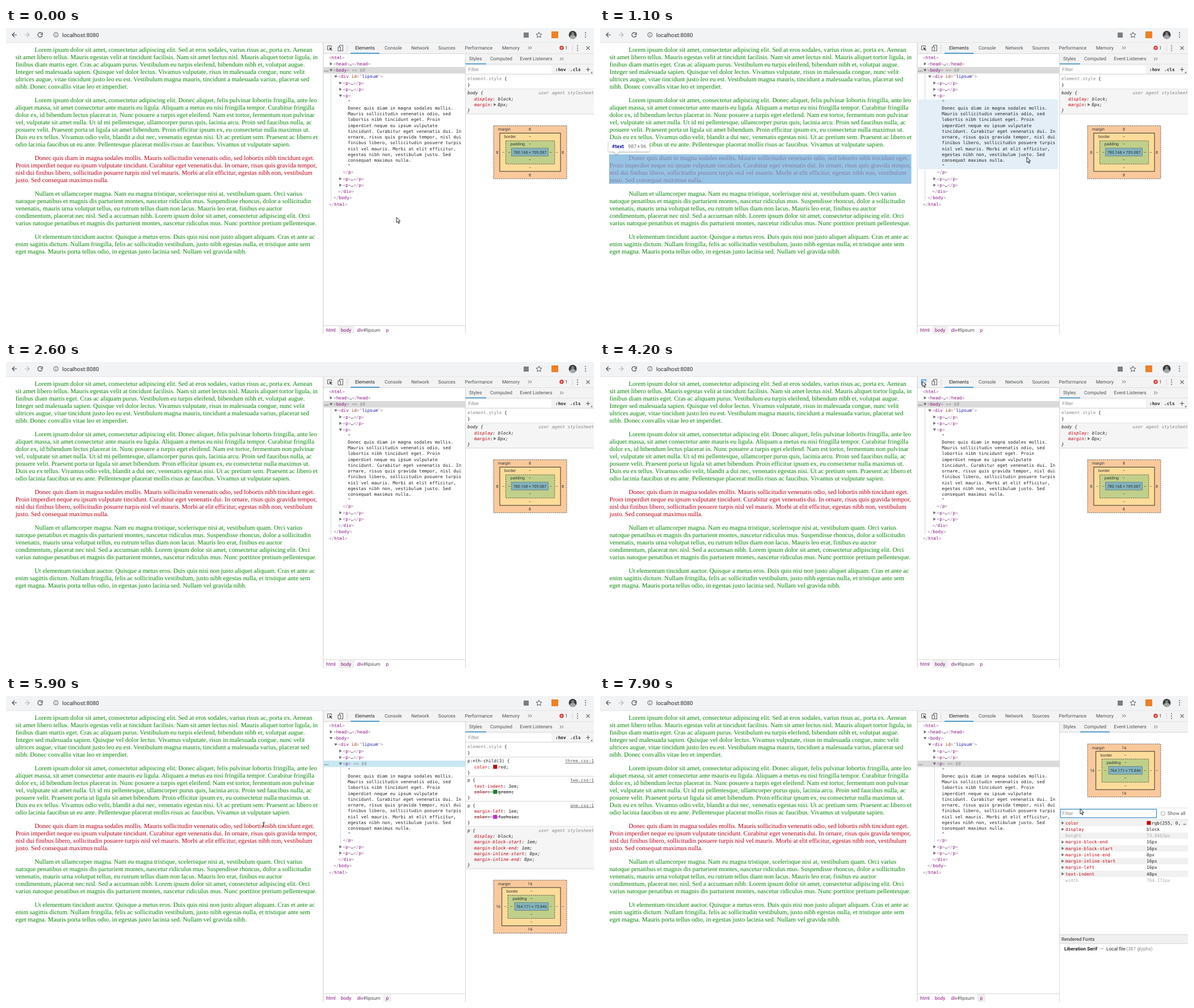
Recreate the animation shown at these times as an HTML page. Size 1036x540 px, loop 8 s.

```html
<!DOCTYPE html>
<html lang="en">
<head>
<meta charset="utf-8">
<title>Inspecting a paragraph</title>
<style>
html, body { margin: 0; width: 100%; height: 100%; overflow: hidden; background: #fff; }
svg { display: block; text-rendering: geometricPrecision; }
text { white-space: pre; cursor: default; }
.page { font: 11.23px "Liberation Serif", serif; fill: #0a860a; }
.red { fill: #bb0018; }
.ui { font: 8.42px Roboto, sans-serif; fill: #4c5054; }
.small { font: 7.02px Roboto, sans-serif; fill: #333; }
.mono { font: 7.72px "DejaVu Sans Mono", monospace; fill: #222; }
.url { font-size: 9.85px; fill: #2b2e31; }
.tip { font: 9.1px Roboto, sans-serif; fill: #707070; }
.dark { fill: #222; }
.gray { fill: #888; }
.dim { fill: #aaa; }
.tag { fill: #881280; }
.br { fill: #a080a0; }
.attr { fill: #994500; }
.val { fill: #1a1aa6; }
.prop { fill: #c00010; }
.it { font-style: italic; }
.b { font-weight: bold; }
.mid { text-anchor: middle; }
.end { text-anchor: end; }
.link { fill: #555; text-decoration: underline; }
.off { display: none; }
#tip { filter: drop-shadow(0 1px 1.5px rgba(0, 0, 0, .35)); }
</style>
</head>
<body>
<svg id="stage" width="1036" height="540" viewBox="0 0 1036 540"></svg>
<script>
const EM = 11.25, LINE = 12.985, TOP = 31.6, LEFT = 5.6;
const CODE = 10.25;
const LOOP = 8000, STEP = 100;
const $ = id => document.getElementById(id);

// ---- drawing helpers (y is the middle of the text line) ----
const esc = s => s.replace(/</g, '&lt;').replace(/>/g, '&gt;');
const span = (cls, s) => `<tspan class="${cls}">${esc(s)}</tspan>`;
const text = (x, y, s, cls, drop) => `<text x="${x}" y="${y + drop}" class="${cls}">${s}</text>`;
const ui = (x, y, s, cls = '') => text(x, y, s, 'ui ' + cls, 2.9);
const mono = (x, y, s, cls = '') => text(x, y, s, 'mono ' + cls, 2.7);
const small = (x, y, s, cls = 'mid') => text(x, y, s, 'small ' + cls, 2.5);
const rect = (x, y, x2, y2, fill, more = '') =>
  `<rect x="${x}" y="${y}" width="${x2 - x}" height="${y2 - y}" fill="${fill}" ${more}/>`;
const path = (d, stroke, w = 1, fill = 'none') =>
  `<path d="${d}" stroke="${stroke}" stroke-width="${w}" fill="${fill}"/>`;
const hline = (x, x2, y, c = '#ccc') => path(`M${x} ${y}H${x2}`, c, .8);
const vline = (x, y, y2, c = '#ccc') => path(`M${x} ${y}V${y2}`, c, .8);
const dot = (x, y, r, fill) => `<circle cx="${x}" cy="${y}" r="${r}" fill="${fill}"/>`;
const dots = x => [-4, 0, 4].map(d => dot(x, d, 1, '#5a5e62')).join('');
const group = (id, s) => `<g id="${id}">${s}</g>`;
const tri = (x, y, open, c = '#6e6e6e') =>
  path(open ? `M${x - 2.8} ${y - 2}h5.6l-2.8 4.4z` : `M${x - 2} ${y - 2.8}v5.6l4.4-2.8z`, 'none', 0, c);
const tag = s => s.replace(/<\/?|>|\w+|…/g, m =>
  m === '…' ? m : span(/\w/.test(m) ? 'tag' : 'br', m));

// ---- the web page ----
const paras = [
  ['Lorem ipsum dolor sit amet, consectetur adipiscing elit. Sed at eros sodales, varius risus ac, porta ex. Aenean',
   'sit amet libero tellus. Mauris egestas velit at tincidunt facilisis. Nam sit amet lectus nisl. Mauris aliquet tortor ligula, in',
   'finibus diam mattis eget. Cras ac aliquam purus. Vestibulum eu turpis eleifend, bibendum nibh et, volutpat augue.',
   'Integer sed malesuada sapien. Quisque vel dolor lectus. Vivamus vulputate, risus in malesuada congue, nunc velit',
   'ultrices augue, vitae tincidunt justo leo eu est. Vestibulum magna mauris, tincidunt a malesuada varius, placerat sed',
   'nibh. Donec convallis vitae leo et imperdiet.'],
  ['Lorem ipsum dolor sit amet, consectetur adipiscing elit. Donec aliquet, felis pulvinar lobortis fringilla, ante leo',
   'aliquet massa, sit amet consectetur ante mauris eu ligula. Aliquam a metus eu nisi fringilla tempor. Curabitur fringilla',
   'dolor ex, id bibendum lectus placerat in. Nunc posuere a turpis eget eleifend. Nam est tortor, fermentum non pulvinar',
   'vel, vulputate sit amet nulla. Ut id mi pellentesque, ullamcorper purus quis, lacinia arcu. Proin sed faucibus nulla, ac',
   'posuere velit. Praesent porta ut ligula sit amet bibendum. Proin efficitur ipsum ex, eu consectetur nulla maximus ut.',
   'Duis eu ex tellus. Vivamus odio velit, blandit a dui nec, venenatis egestas nisi. Ut ac pretium sem. Praesent ac libero et',
   'odio lacinia faucibus ut eu ante. Pellentesque placerat mollis risus ac faucibus. Vivamus ut vulputate sapien.'],
  ['Donec quis diam in magna sodales mollis. Mauris sollicitudin venenatis odio, sed lobortis nibh tincidunt eget.',
   'Proin imperdiet neque eu ipsum vulputate tincidunt. Curabitur eget venenatis dui. In ornare, risus quis gravida tempor,',
   'nisl dui finibus libero, sollicitudin posuere turpis nisl vel mauris. Morbi at elit efficitur, egestas nibh non, vestibulum',
   'justo. Sed consequat maximus nulla.'],
  ['Nullam et ullamcorper magna. Nam eu magna tristique, scelerisque nisi at, vestibulum quam. Orci varius',
   'natoque penatibus et magnis dis parturient montes, nascetur ridiculus mus. Suspendisse rhoncus, dolor a sollicitudin',
   'venenatis, mauris urna volutpat tellus, eu rutrum tellus diam non lacus. Mauris leo erat, finibus eu auctor',
   'condimentum, placerat nec nisl. Sed a accumsan nibh. Lorem ipsum dolor sit amet, consectetur adipiscing elit. Orci',
   'varius natoque penatibus et magnis dis parturient montes, nascetur ridiculus mus. Nunc porttitor pretium pellentesque.'],
  ['Ut elementum tincidunt auctor. Quisque a metus eros. Duis quis nisi non justo aliquet aliquam. Cras et ante ac',
   'enim sagittis dictum. Nullam fringilla, felis ac sollicitudin vestibulum, justo nibh egestas nulla, et tristique ante sem',
   'eget magna. Mauris porta tellus odio, in egestas justo lacinia sed. Nullam vel gravida nibh.']
];

// Boxes that can be highlighted; m holds margins: top, right, bottom, left.
const boxes = {
  html: { x: 0, y: 26, w: 558.6, h: 508.7, name: span('tag', 'html'), size: '796.17×725.09' },
  body: { x: LEFT, y: TOP, w: 547.4, h: 497.5, m: [5.6, 5.6, 5.6, 5.6], name: span('tag', 'body'), size: '780.17×709.09' },
  div: { x: LEFT, y: TOP, w: 547.4, h: 370, name: span('tag', 'div') + span('val', '#lipsum'), size: '780.17×525.53' }
};
let pageText = '', y = TOP;
paras.forEach((lines, i) => {
  const h = lines.length * LINE;
  boxes['p' + (i + 1)] = {
    x: 16.8, y, w: 536.1, h, m: [EM, 0, EM, EM],
    name: span('tag', 'p'), size: '764.17×' + (lines.length * 24 / 1.3).toFixed(2)
  };
  lines.forEach((s, n) => {
    pageText += text(n ? 16.7 : 50.4, y + 6.5 + n * LINE, s, i === 2 ? 'page red' : 'page', 3.5);
  });
  y += h + EM;
});
boxes.text = { x: 16, y: boxes.p3.y, w: 532.6, h: 52, name: span('val', '#text'), size: '987×96' };

// ---- browser bar ----
const bar = rect(0, 0, 1036, 26, '#f2f3f4') + hline(0, 1036, 25.8, '#dcdddf') +
  path('M19 12H11M15 8l-4 4l4 4', '#4a4d51', 1.2) +
  path('M33 12h8M37 8l4 4l-4 4', '#b4b6b9', 1.2) +
  path('M63 9.3A4 4 0 1 0 64 13M64.3 8v3.3h-3.3', '#4a4d51', 1.2) +
  `<circle cx="88" cy="12" r="4" fill="none" stroke="#5f6368"/>` +
  path('M88 11.5v2.7M88 9.6v1', '#5f6368') +
  text(99, 12, 'localhost:8080', 'ui url', 3.5) +
  rect(912, 8, 921, 17, '#7b7f84') +
  path('M939 7.3l1.5 3.2l3.5.4l-2.6 2.4l.7 3.5l-3.1-1.8l-3.1 1.8l.7-3.5l-2.6-2.4l3.5-.4z', '#55595d') +
  rect(961, 6, 973, 18, '#ee8126') +
  dot(998.5, 12, 7, '#3c3d3e') + path('M993 17a5.5 5 0 0 1 11 0a7 7 0 0 1-11 0z', 'none', 0, '#a5a6a4') +
  dot(998.5, 10, 2.4, '#85837f') +
  `<g transform="translate(0 12)">${dots(1021)}</g>`;

// ---- developer tools: top bar ----
const tabs = [['Elements', 615], ['Console', 667], ['Network', 714], ['Sources', 761.5],
  ['Performance', 808.5], ['Memory', 874]];
const more = (x, y) => path(`M${x} ${y - 2.5}l2.5 2.5l-2.5 2.5m3.5-5l2.5 2.5l-2.5 2.5`, '#5a5e62', 1);
const tools = rect(559, 26, 1036, 540, '#fff') + rect(559, 26, 1036, 45, '#f3f3f3') +
  hline(559, 1036, 45.3) + vline(559, 26, 540, '#bbb') +
  tabs.map(([s, x], i) => ui(x, 35, s, i ? '' : 'dark')).join('') +
  rect(607, 43.8, 658, 45.4, '#2a8bc4') +
  path('M573.5 34V31.5h-7v7h3', '#5a5e62') + path('M569.5 34l5.5 2l-2.2 1l2 2.2l-1 1l-2-2.2l-1 2z', 'none', 0, '#4a4e52') +
  group('picking', path('M574 34V31.5h-7.5v8h3', '#2d86d9', 1.4) +
    rect(567, 32, 573.5, 39, '#cfe4f8')) +
  path('M587.5 33v-2.5h6v10h-3M585 33.5h4.5v7h-4.5z', '#5a5e62') + vline(601, 30, 41) +
  more(920, 35) + dot(979, 35, 3.8, '#d93a3a') + path('M977.6 33.6l2.8 2.8m0-2.8l-2.8 2.8', '#fff', .9) +
  ui(985, 35, '1') + vline(998, 30, 41) +
  `<g transform="translate(0 35.5)">${dots(1007)}</g>` +
  path('M1022.5 32.3l6 6m0-6l-6 6', '#5a5e62', 1.2);

// ---- element tree ----
const closed = tag('<p>…</p>');
const rows = [
  [52, 569, tag('<html>')], [63.3, 577, tag('<head>…</head>'), 0], [74.5, 577, tag('<body>'), 1],
  [85.7, 585.3, tag('<div') + ' ' + span('attr', 'id') + span('br', '="') + span('val', 'lipsum') + span('br', '">'), 1],
  [97, 593.6, closed, 0], [108.3, 593.6, closed, 0], [119.6, 593.6, tag('<p>'), 1], [130.7, 602.3, '"'],
  [243.7, 602.3, '"'], [254.7, 593.6, tag('</p>')], [266, 593.6, closed, 0], [277.2, 593.6, closed, 0],
  [288.4, 585.3, tag('</div>')], [299.6, 577, tag('</body>')], [310.8, 569, tag('</html>')]
];
const nodeText = ['Donec quis diam in magna sodales mollis.', 'Mauris sollicitudin venenatis odio, sed',
  'lobortis nibh tincidunt eget. Proin', 'imperdiet neque eu ipsum vulputate',
  'tincidunt. Curabitur eget venenatis dui. In', 'ornare, risus quis gravida tempor, nisl dui',
  'finibus libero, sollicitudin posuere turpis', 'nisl vel mauris. Morbi at elit efficitur,',
  'egestas nibh non, vestibulum justo. Sed', 'consequat maximus nulla.'];
const selected = (y, x, guide, end) => mono(x, y, '== $0', 'it gray') +
  [561.5, 564.3, 567.1].map(d => dot(d, y + 1.6, .8, '#555')).join('') + vline(guide, y + 6, end, '#b9cfd8');
const tree = rows.map(([y, x, s, open]) =>
  mono(x, y, s) + (open === undefined ? '' : tri(x - 4.3, y, open))).join('') +
  nodeText.map((s, i) => mono(602.3, 141 + i * 10.28, s)).join('');

const crumbs = hline(559, 809, 525.3) + ui(564, 533, 'html', 'tag') + ui(590, 533, 'body', 'tag') +
  ui(618.5, 533, span('tag', 'div') + span('', '#lipsum')) + ui(669.5, 533, 'p', 'tag');

// ---- sidebar ----
const sideTabs = rect(810, 45.6, 1036, 64, '#f3f3f3') + hline(810, 1036, 64) +
  group('tabHover', rect(846, 46, 898, 63.6, '#eaeaea')) + ui(816, 54, 'Styles') + ui(853, 54, 'Computed') +
  ui(905.5, 54, 'Event Listeners') + more(976, 54.5) +
  `<rect id="underline" y="62.6" height="1.5" fill="#2a8bc4"/>`;

function rule(y, selector, props, link, ua) {
  const it = ua ? 'it' : '', close = y + CODE * (props.length + 1);
  let s = ua ? rect(810, y - 6.6, 1036, close + 6.3, '#f5f5f5') : '';
  s += mono(813, y, selector + ' {', it);
  if (link) s += mono(1036, y, link, 'end ' + (ua ? 'it gray' : 'link'));
  props.forEach(([name, value, swatch, struck], i) => {
    const py = y + CODE * (i + 1), vx = 825 + (name.length + 2) * 4.648;
    s += mono(825, py, span('prop', name) + ':', it);
    if (swatch === 'arrow') s += tri(vx - .8, py, 0);
    s += mono(vx + (swatch ? swatch === 'arrow' ? 4 : 9.4 : 0), py, value + ';', it);
    if (struck) s += hline(825, vx + 14 + value.length * 4.648, py + .2, '#555');
    if (swatch && swatch !== 'arrow') s += rect(vx + .8, py - 3.4, vx + 7.8, py + 3.4, swatch, 'stroke="#888" stroke-width=".4"');
  });
  return s + mono(813, close, '}', it) + hline(810, 1036, close + 6.4);
}

// Stacks rules below one another, each given as the arguments after y.
function rules(y, list) {
  return list.map(args => {
    const s = rule(y, ...args);
    y += CODE * (args[1].length + 2) + 3.2;
    return s;
  }).join('');
}

function boxModel(y, inset, m, right, size) {
  const b = 870 + inset, p = 880.5 + inset, c = 890.5 + inset * 1.5, cx = (c + 955.5) / 2;
  const dash = 'stroke="#333" stroke-width=".8" stroke-dasharray="2 1.4"';
  const solid = 'stroke="#222" stroke-width=".9"', mx = inset ? 923.5 : 923;
  return rect(859, y, 988, y + 93.5, '#f9c99c', dash) +
    rect(b, y + 13, 977, y + 80.5, '#fddc9a', solid) +
    rect(p, y + 26.5, 966.7, y + 67.5, '#c0d08a', dash) +
    rect(c, y + 39.5, 955.5, y + 53.5, '#82b4bd', 'stroke="#777" stroke-width=".8"') +
    small(867, y + 6.3, 'margin', '') + small(b + 8, y + 19.3, 'border', '') + small(p + 8.3, y + 32.3, 'padding', '') +
    [6.3, 86.7].map(d => small(mx, y + d, m)).join('') +
    [19.3, 32.3, 60.2, 73.7].map(d => small(cx, y + d, '–')).join('') +
    small(cx, y + 46.5, size) + small(inset ? 867.3 : 865.5, y + 46.5, m) + small(981, y + 46.5, right) +
    [b + 6.2, p + 6.2, 960, 970.5].map(x => small(x, y + 46.5, '–')).join('');
}

const styleTop = rect(810, 64.5, 1036, 81.4, '#f3f3f3') + rect(810, 66, 961, 80.5, '#fff') + hline(810, 1036, 81.6) +
  ui(814.5, 73, 'Filter', 'gray') + mono(968, 73, ':hov', 'b') + mono(994, 73, '.cls', 'b') +
  path('M1022 73.3h7m-3.5-3.5v7', '#555', 1.1) + path('M1033 79.5v-3l-3 3z', 'none', 0, '#666') +
  mono(813, 89.7, span('gray', 'element.style') + ' {') + mono(813, 100, '}') + hline(810, 1036, 107.8);
const bodyStyles = rules(114.7, [
  ['body', [['display', 'block'], ['margin', '8px', 'arrow']], 'user agent stylesheet', true]
]) + boxModel(172.5, 0, '8', '8', '780.168 × 709.087');
const pBox = y => boxModel(y, 3.7, '16', '–', '764.171 × 73.846');
const pStyles = rules(114.7, [
  ['p:nth-child(3)', [['color', 'red', '#c4000c']], 'three.css:1'],
  ['p', [['text-indent', '3em'], ['color', 'green', '#12821a', true]], 'two.css:1'],
  ['p', [['margin-left', '1em'], ['color', 'fuchsia', '#d420d4', true]], 'one.css:1'],
  ['p', [['display', 'block'], ['margin-block-start', '1em'], ['margin-block-end', '1em'],
    ['margin-inline-start', '0px'], ['margin-inline-end', '0px']], 'user agent stylesheet', true]
]) + pBox(325);

const values = [['color', 'rgb(255, 0, …'], ['display', 'block'], ['height', '73.8462px'], ['margin-block-end', '16px'],
  ['margin-block-start', '16px'], ['margin-inline-end', '0px'], ['margin-inline-start', '16px'],
  ['margin-left', '16px'], ['text-indent', '48px'], ['width', '764.171px']];
const computed = pBox(84.7) + hline(810, 1036, 197.5, '#ddd') +
  rect(811.5, 199.8, 980.5, 214.8, '#fff', 'stroke="#4f97c9" stroke-width="1.4"') +
  ui(814.5, 207.5, 'Filter', 'gray') +
  rect(988.5, 204, 995, 210.5, '#fff', 'stroke="#999" stroke-width=".8" rx="1"') + ui(1000, 207.5, 'Show all') +
  hline(810, 1036, 218) +
  values.map(([name, value], i) => {
    const y = 224 + i * 11.23, dim = /height|width/.test(name) ? 'dim' : '';
    return (i % 2 ? '' : rect(810, y - 5.6, 1036, y + 5.6, '#f1f1f1')) + (dim ? '' : tri(815.3, y, 0)) +
      mono(820, y, name, dim || 'prop') + (i ? '' : rect(963.5, y - 3.4, 970.5, y + 3.4, '#c4000c')) +
      mono(i ? 963 : 972, y, value, dim);
  }).join('') +
  rect(810, 421, 1036, 437, '#f0f0f0') + hline(810, 1036, 421) + hline(810, 1036, 437) +
  ui(813, 429, 'Rendered Fonts', 'dark') + ui(818, 446, 'Liberation Serif', 'b dark') +
  ui(881, 446, '—') + ui(892, 446, 'Local file', 'dark') + ui(927, 446, '(387 glyphs)', 'gray');

// ---- stage ----
$('stage').innerHTML = rect(0, 0, 1036, 540, '#fff') + pageText +
  group('mark', '') + group('tip', '') + bar + tools +
  group('onBody', rect(559.5, 69, 809, 80.4, '#dadada') + selected(74.5, 609.6, 572.6, 305) + rect(586, 526, 613.5, 540, '#f0f0f0')) +
  group('onP', '<rect id="row" x="559.5" y="114" width="249.5" height="11.4"/>' +
    selected(119.6, 612.3, 589.6, 260) + rect(665, 526, 679, 540, '#f0f0f0')) +
  `<rect id="hover" x="561" width="246" rx="3" fill="#e3eef6"/>` + tree + crumbs +
  vline(809.5, 45, 540) + sideTabs +
  group('styleTop', styleTop) + group('bodyStyles', bodyStyles) + group('pStyles', pStyles) + group('computed', computed) +
  group('arrow', path('M0 0v9.3l2.2-2l1.5 3.6l1.5-.7l-1.5-3.4h2.9z', '#111', .9, '#fff')) +
  group('beam', path('M-2 -4.2q2 0 2 1v6.4q0 1-2 1M2 -4.2q-2 0-2 1v6.4q0 1 2 1', '#222', .9));

// ---- motion: time, x, y ----
const moves = [
  [0, 688, 334], [100, 687, 333], [200, 687, 333], [400, 697, 322], [700, 745, 279], [900, 757, 246],
  [1100, 752, 228], [1400, 700, 190], [1800, 612, 146], [2000, 612, 146], [2300, 594, 137], [2400, 594, 112],
  [2500, 596, 80], [2600, 600, -20], [3100, 628, -20], [3200, 625, 3], [3600, 590, 22], [4000, 568, 34],
  [4500, 568, 34], [4700, 545, 52], [5000, 485, 150], [5300, 454, 227], [5900, 454, 227], [6100, 478, 218],
  [6300, 640, 155], [6500, 815, 82], [6700, 867, 62], [6900, 871, 58], [7400, 871, 58], [7900, 846, 199]
];
// Highlighted box and its tree row; no row means it comes from the box model.
const hovers = [
  [0], [500, 'html', 310.8], [600, 'body', 299.6], [700, 'div', 288.4], [800, 'p5', 277.2], [900, 'p4', 266],
  [1000, 'p3', 254.7], [1100, 'text', 187.5], [2500, 'p2', 108.3], [2600], [4700, 'p1', 97], [4900, 'p2', 108.3],
  [5100, 'p3', 119.6], [5900], [6300, 'text', 187.5], [6400, 'p2', 108.3], [6500, 'p1', 97], [6600], [7600, 'p3'], [7800]
];

const show = (id, on) => $(id).classList.toggle('off', !on);
const move = (id, x, y) => $(id).setAttribute('transform', `translate(${x} ${y})`);

function pointer(t) {
  const i = moves.findIndex(m => m[0] > t);
  if (i < 0) return moves[moves.length - 1].slice(1);
  const [t0, x0, y0] = moves[i - 1], [t1, x1, y1] = moves[i], f = (t - t0) / (t1 - t0);
  return [x0 + (x1 - x0) * f, y0 + (y1 - y0) * f];
}

function highlight([, key, row]) {
  const box = boxes[key];
  show('mark', box);
  show('tip', box && row);
  show('hover', row);
  if (!box) return;
  const { x, y, w, h, m = [0, 0, 0, 0] } = box;
  const top = y - m[0], bottom = y + h + m[2], left = x - m[3];
  $('mark').innerHTML = rect(x, y, x + w, y + h, 'rgba(111,174,220,.72)') +
    `<path fill-rule="evenodd" fill="rgba(246,178,107,.66)" d="M${left} ${top}H${x + w + m[1]}V${bottom}H${left}zM${x} ${y}h${w}v${h}h${-w}z"/>`;
  if (!row) return;
  const tall = key === 'text' ? 61.5 : 5.7;
  $('hover').setAttribute('y', row - tall);
  $('hover').setAttribute('height', tall * 2);

  const above = top - 23.5 > 26, ty = above ? top - 23.5 : Math.min(bottom + 5, 517), tx = Math.max(left - 1, 4);
  const arrow = above ? `M${tx + 9} ${ty + 18}h10l-5 5z` : `M${tx + 9} ${ty + .5}h10l-5-5z`;
  $('tip').innerHTML = rect(tx, ty, tx + 10, ty + 18.5, '#fff', 'rx="2"') + path(arrow, 'none', 0, '#fff') +
    text(tx + 6, ty + 9.2, `<tspan class="b">${box.name}</tspan><tspan dx="7">${box.size.replace('×', '\u200a×\u200a')}</tspan>`, 'tip', 3.2);
  $('tip').firstChild.setAttribute('width', $('tip').lastChild.getBBox().width + 12);
}

function render(t) {
  const picked = t >= 5900, detail = t >= 7100, beam = picked && t < 6200;
  highlight(hovers.filter(h => h[0] <= t).pop());
  show('onBody', !picked);
  show('onP', picked);
  $('row').setAttribute('fill', detail ? '#dadada' : '#c9e8f3');
  show('picking', t >= 4200 && !picked);
  show('styleTop', !detail);
  show('bodyStyles', !picked);
  show('pStyles', picked && !detail);
  show('computed', detail);
  show('tabHover', t >= 6700 && !detail);
  $('underline').setAttribute('x', detail ? 846 : 810);
  $('underline').setAttribute('width', detail ? 52 : 36);
  show('arrow', !beam);
  show('beam', beam);
  move(beam ? 'beam' : 'arrow', ...pointer(t));
}

let last = -1;
const start = performance.now();
function tick() {
  const t = Math.floor((performance.now() - start) % LOOP / STEP) * STEP;
  if (t !== last) render(last = t);
  requestAnimationFrame(tick);
}
tick();
</script>
</body>
</html>
```
